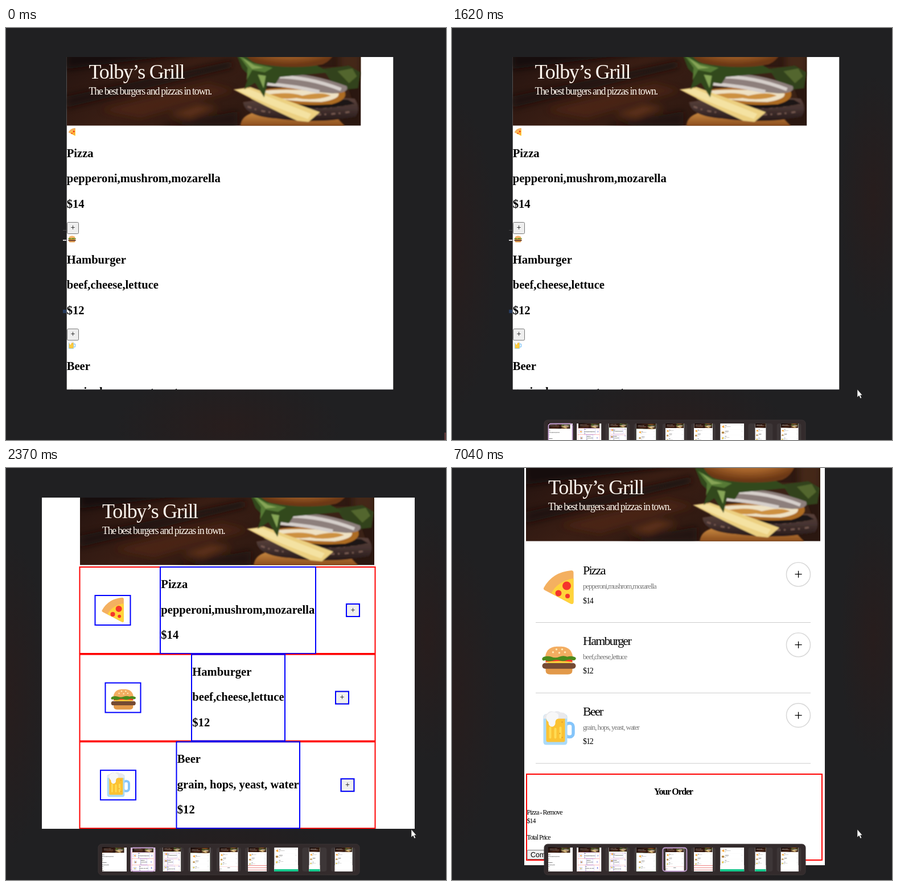
An HTML page that plays this animation: 773x724 px, repeating every 8 s.

```html
<!DOCTYPE html>
<html lang="en">
<head>
<meta charset="utf-8">
<title>Menu page steps</title>
<style>
  html, body { margin: 0; width: 100%; height: 100%; overflow: hidden; background: #202022; }
  #stage { display: block; width: 773px; height: 724px; }
  text { white-space: pre; }
  .bold { font: bold 20.6px "Liberation Serif", "Times New Roman", serif; }
  .menu { font-family: "Liberation Serif", "Times New Roman", serif; letter-spacing: -.08em; }
  .plus { font-family: "Liberation Serif", "Times New Roman", serif; text-anchor: middle; }
  .ui { font-family: "Liberation Sans", Arial, sans-serif; }
  .box { fill: none; stroke-width: 2; }

  .scene, .corner, .sides, .cursor, .strip, .pick { animation: 8s step-end infinite; }
  .scene { visibility: hidden; }
  .scene1 { animation-name: scene1; }
  .scene2 { animation-name: scene2; }
  .scene3 { animation-name: scene3; }
  .scene4 { animation-name: scene4; }
  .scene5 { animation-name: scene5; }
  .corner { animation-name: corner; }
  .sides { animation-name: sides; }
  .cursor { animation-name: cursor; }
  .strip { animation-name: strip; }
  .pick { animation-name: pick; }

  @keyframes scene1 { 0% { visibility: visible } 29.625%, 100% { visibility: hidden } }
  @keyframes scene2 { 0% { visibility: hidden } 29.625% { visibility: visible } 47.25%, 100% { visibility: hidden } }
  @keyframes scene3 { 0% { visibility: hidden } 47.25% { visibility: visible } 69.625%, 100% { visibility: hidden } }
  @keyframes scene4 { 0% { visibility: hidden } 69.625% { visibility: visible } 88%, 100% { visibility: hidden } }
  @keyframes scene5 { 0% { visibility: hidden } 88%, 100% { visibility: visible } }
  @keyframes corner { 0% { visibility: visible } .875%, 100% { visibility: hidden } }
  @keyframes sides { 0% { visibility: hidden } 19.375%, 100% { visibility: visible } }

  @keyframes cursor {
    0% { transform: translate(662px, 730px) }
    8.25% { transform: translate(662px, 714px) }
    9.125% { transform: translate(669px, 689px) }
    10% { transform: translate(677px, 664px) }
    10.875% { transform: translate(686px, 645px) }
    11.75% { transform: translate(694px, 633px) }
    12.625% { transform: translate(701px, 627px) }
    13.5% { transform: translate(707px, 626px) }
    14.375% { transform: translate(711px, 631px) }
    16%, 100% { transform: translate(712px, 635px) }
  }
  @keyframes strip {
    0% { transform: translateY(64px) }
    19.375% { transform: translateY(44px) }
    20.25% { transform: translateY(28px) }
    21.125% { transform: translateY(17px) }
    22% { transform: translateY(9px) }
    22.875% { transform: translateY(5px) }
    23.75% { transform: translateY(2px) }
    24.625% { transform: translateY(1px) }
    25.5%, 100% { transform: none }
  }
  @keyframes pick {
    0% { transform: none }
    29.625% { transform: translateX(50.2px) }
    47.25% { transform: translateX(100.4px) }
    69.625% { transform: translateX(150.6px) }
    88%, 100% { transform: translateX(200.8px) }
  }
</style>
</head>
<body>
<svg id="stage" viewBox="0 0 773 724">
  <defs>
    <radialGradient id="glow"><stop stop-color="#2a1c1b" stop-opacity=".75"/><stop offset="1" stop-color="#2a1c1b" stop-opacity="0"/></radialGradient>
    <linearGradient id="wood" x2="1" y2=".4"><stop stop-color="#22120f"/><stop offset=".45" stop-color="#3a1e14"/><stop offset="1" stop-color="#2a1710"/></linearGradient>
    <radialGradient id="bun" cx=".5" cy=".35" r=".6"><stop stop-color="#c4853f"/><stop offset=".6" stop-color="#a4622a"/><stop offset="1" stop-color="#6b3714"/></radialGradient>
    <linearGradient id="base" x2="0" y2="1"><stop stop-color="#c98a42"/><stop offset="1" stop-color="#8b4d1d"/></linearGradient>
    <linearGradient id="patty" x2="0" y2="1"><stop stop-color="#5b423b"/><stop offset=".5" stop-color="#453230"/><stop offset="1" stop-color="#261918"/></linearGradient>
    <filter id="soft" x="-20%" y="-50%" width="140%" height="200%"><feGaussianBlur stdDeviation="6"/></filter>
    <filter id="blur"><feGaussianBlur stdDeviation="1"/></filter>

    <g id="pizza">
      <path fill="#f4b060" d="M4 31Q19 4 52 1q4 0 4 4v51q0 6-6 3L6 36q-4-2-2-5"/>
      <path fill="#ffd43b" d="M17 41Q28 20 56 15v41q0 6-6 3z"/>
      <g fill="#f5352c"><circle cx="44" cy="28" r="7.5"/><circle cx="29.5" cy="41" r="5.5"/><circle cx="45.5" cy="46" r="4"/></g>
    </g>
    <g id="burger">
      <path fill="#e2994a" d="M7 49h47v4q0 7-8 7H15q-8 0-8-7z"/>
      <path fill="#f3ad61" d="M6 32q1-20 20-21h9q19 1 20 21z"/>
      <path fill="#f5352c" d="M7 33h47v6H7z"/>
      <path fill="#ffd43b" d="M6 38q25-3 49 0l-10 4q-14 4-28 0z"/>
      <path fill="#4c8a1c" d="M4 29q7-2 13 0 7 3 14 0t14 0q6-2 12 0 4 1 3 4-1 3-6 2-5-2-10 0-7 3-13 0-6-2-12 1-8 2-13-1-4 2-5-1t3-5"/>
      <rect x="1" y="40" width="59" height="10" rx="5" fill="#754a33"/>
      <g fill="#ffe9b5"><circle cx="26" cy="16" r="1.7"/><circle cx="36" cy="16" r="1.7"/><circle cx="20" cy="21" r="1.7"/><circle cx="31" cy="22" r="1.7"/><circle cx="41" cy="21" r="1.7"/></g>
    </g>
    <g id="beer">
      <rect x="42" y="22" width="13.5" height="24" rx="6" fill="none" stroke="#85c5fa" stroke-width="5.5"/>
      <rect x="3" y="6" width="42" height="54" rx="5" fill="#aadaf8"/>
      <rect x="8" y="12" width="33" height="43" rx="3" fill="#fbc233"/>
      <path stroke="#ffdc55" stroke-width="4" stroke-linecap="round" d="M15 30v17M24 32v15M33 30v17"/>
      <path fill="#e9e9ec" d="M3 14Q3 6 10 5q4-6 12-3 7-3 11 1 11-1 12 11z"/>
      <path fill="#f7f7f8" d="M9 8q6-8 15-5 8 2 5 11-5 1-5 7v2q-2 6-7 5-5-1-5-8-6-5-3-12"/>
      <g fill="#d98b2a"><circle cx="36" cy="20" r="1"/><circle cx="32" cy="40" r="1"/><circle cx="36" cy="47" r="1"/></g>
    </g>
    <svg id="photo" width="517" height="143.5">
      <path fill="url(#wood)" d="M0 0h517v144H0z"/>
      <g filter="url(#soft)">
        <path fill="#170d0c" d="M0 0h290v8L0 44z"/>
        <path fill="#5a2c18" opacity=".5" d="M60 116l190-46 45 12-165 48z"/>
        <path fill="#180d0b" opacity=".8" d="M0 92l290-62v12L0 112z"/>
        <path fill="#804322" opacity=".55" d="M180 124l50-17 36 4-50 19z"/>
        <path fill="#180c0b" opacity=".7" d="M160 144l140-26v26z"/>
        <path fill="#50301a" opacity=".7" d="M480 0h37v60h-37z"/>
      </g>
      <g filter="url(#blur)">
        <path fill="#3a2416" d="M316 40h165l25 70-180 6z"/>
        <path fill="url(#base)" d="M305 144q2-20 28-24l140 8 16 16z"/>
        <path fill="url(#patty)" d="M310 102q80-12 196-6 12 16 2 32-66 13-140 3-56-4-58-29"/>
        <path fill="none" stroke="#76594f" stroke-width="3" stroke-dasharray="7 6 3 9" d="M425 112q40 2 78-8M440 124q30 0 60-5M318 110q20 8 40 10"/>
        <path fill="#1f1412" d="M326 90l168 8 12 7q-60 14-130 4z"/>
        <path fill="#ad6c23" d="M318 86q70-18 170-4 8 16-22 24-84 6-148-20"/>
        <path fill="#efe2c4" d="M330 84q60-9 148 3 2 10-30 15-76 0-118-18"/>
        <path fill="#cd9140" d="M352 89q40-6 62 2 34-8 50 0-30 10-60 4-30 4-52-6"/>
        <path fill="#ecd081" d="M293 80l30-4 122 44-20 17-20-2Q350 110 293 80"/>
        <path fill="#f4e2a2" d="M300 81l20-2 110 44-6 9Q350 106 300 81"/>
        <path fill="#33431c" d="M450 44l46-6 20 12-4 28-36 4z"/>
        <path fill="#52662d" d="M476 48l26-5 8 14-14 12z"/>
        <path fill="#8d7f7b" d="M340 56q66-14 152 18 6 12-24 13-80-6-128-31"/>
        <path fill="none" stroke="#d6cfcb" stroke-width="6" d="M350 58q66-4 132 22M352 70q50 4 92 14"/>
        <path fill="#30481d" d="M297 15q24-2 36 14l44 9 60-2 24 14-86 8-8 12-14-2-6 26-16-26-19 12 8-25-12-12z"/>
        <path fill="#567a36" d="M302 20l26 14 34 8-14 8-22-4-10 18 2-22z"/>
        <path fill="#86a556" d="M308 24l22 14 16 4-20 2zM336 54l14 2-4 22z"/>
        <path fill="url(#bun)" d="M308-30q-6 54 26 64 62 12 116 2 30-12 27-66z"/>
      </g>
      <g class="menu" fill="#fff8ef">
        <text x="39" y="60.5" font-size="36">Tolby’s Grill</text>
        <text x="39" y="88.5" font-size="17.9">The best burgers and pizzas in town.</text>
      </g>
    </svg>
  </defs>
</svg>
<script>
const dishes = [
  ['Pizza', 'pepperoni,mushrom,mozarella', '$14', 'pizza'],
  ['Hamburger', 'beef,cheese,lettuce', '$12', 'burger'],
  ['Beer', 'grain, hops, yeast, water', '$12', 'beer']
];

const rect = (x, y, w, h, attrs) => `<rect x="${x}" y="${y}" width="${w}" height="${h}" ${attrs}/>`;
const box = (x, y, w, h, color) => rect(x, y, w, h, `class="box" stroke="${color}"`);
const text = (x, y, cls, s, attrs = '') => `<text x="${x}" y="${y}" class="${cls}" ${attrs}>${s}</text>`;
const line = (x1, x2, y) => `<path d="M${x1} ${y}H${x2}" stroke="#ccc"/>`;
const photo = (x, y) => `<use href="#photo" x="${x}" y="${y}"/>`;
const icon = (name, x, y, k = 1) => `<use href="#${name}" transform="translate(${x} ${y}) scale(${k})"/>`;
const plus = (x, y, size) => text(x, y + size / 4, 'plus', '+', `font-size="${size}"`);
const button = (x, y, w, h, size) =>
  rect(x + .5, y + .5, w - 1, h - 1, 'rx="2" fill="#efefef" stroke="#767676"') + plus(x + w / 2, y + h / 2, size);
const rows = draw => dishes.map(draw).join('');

const boldLines = (x, y, d) => [0, 1, 2].map(n => text(x, y + n * 44.6, 'bold', d[n])).join('');
const menuLines = (x, y, d) =>
  text(x, y, 'menu', d[0], 'font-size="22"') +
  text(x, y + 25, 'menu', d[1], 'font-size="12.8" fill="#767676"') +
  text(x, y + 50.5, 'menu', d[2], 'font-size="14"');

// Each page crops itself to its white sheet.
const page = (id, x, y, w, h, body) =>
  `<svg id="${id}" x="${x}" y="${y}" width="${w}" height="${h}" viewBox="${x} ${y} ${w} ${h}">` +
  rect(x, y, w, h, 'fill="#fff"') + body + '</svg>';

const plain = page('plain', 106.5, 51, 574, 584.5, photo(106.5, 28) + rows((d, i) => {
  const y = i * 187.3;
  return icon(d[3], 109, 175.5 + y, .23) + boldLines(106.7, 226.5 + y, d) + button(107, 341 + y, 21, 21, 14);
}));

const spread = page('spread', 63, 52, 655, 582, photo(130, 27) + rows((d, i) => {
  const y = 174 + i * 153.6;
  const [pic, left, width, add] = [[156.5, 271, 273, 598], [174.5, 326, 164, 579], [166, 299.5, 216.5, 588.5]][i];
  return box(129.5, y, 519, 152, '#f00') + box(pic, y + 50, 62, 52, '#00f') +
    icon(d[3], pic + 9.5, y + 53, .73) + box(left, y, width, 152, '#00f') +
    boldLines(left + 1.3, y + 37, d) + button(add, y + 65, 23, 22, 14) + box(add, y + 65, 23, 22, '#00f');
}));

const boxed = page('boxed', 131, 0, 521, 702, photo(138, -30) + box(144, 117, 505.5, 620, '#008000') + rows((d, i) => {
  const y = 153 + i * 188;
  return box(180.5, y, 432.5, 152, '#f00') + box(180.5, y, 83, 70, '#00f') + icon(d[3], 191.5, y + 3) +
    box(263, y, [273, 164, 216.5][i], 152, '#00f') + boldLines(264, y + 37, d) +
    button(590, y, 23, 22, 14) + box(590, y, 23, 22, '#00f');
}));

const styled = page('styled', 125, 16, 531, 655, photo(131, 16) + box(130.5, 163, 518.5, 476, '#008000') + rows((d, i) => {
  const y = i * 147;
  return icon(d[3], 193, 218 + y) + menuLines(265, 237 + y, d) + button(596, 216 + y, 18, 20, 8) + line(165, 631, 310 + y);
}));

const order = page('order', 127, 0, 528, 698, photo(130, -15) + rows((d, i) => {
  const y = i * 123.8;
  return icon(d[3], 157.5, 179 + y) + menuLines(230, 187 + y, d) +
    `<circle cx="608.5" cy="${187 + y}" r="21" fill="#fff" stroke="#d9d9d9" stroke-width="1.6"/>` +
    plus(608.5, 188.5 + y, 26) + line(147, 630, 271.5 + y);
}) + box(131, 538, 519, 151, '#f00') +
  text(355, 574, 'menu', 'Your Order', 'font-size="16.1" font-weight="bold"') +
  text(131.5, 609, 'menu', 'Pizza - Remove', 'font-size="11.9"') +
  text(131.5, 624, 'menu', '$14', 'font-size="11.9"') +
  text(131.5, 653, 'menu', 'Total Price', 'font-size="11.9"') +
  rect(132, 671.5, 100, 16, 'rx="2" fill="#efefef" stroke="#767676"') +
  text(138, 684, 'ui', 'Complete order', 'font-size="12.5"'));

const pages = [plain, spread, boxed, styled, order];
const edgeMarks =
  rect(100, 355, 6, 1, 'fill="#48484a"') + rect(100, 372, 6, 2, 'fill="#d0d0d0"') + rect(100, 495, 6, 6, 'fill="#263a5c"');

// Thumbnails: page, left inset, width, visible area.
const thumbs = [
  ['plain', 0, 43, '107 51 574 560'], ['spread', 0, 43, '63 52 655 582'], ['boxed', 6, 32, '131 0 521 702'],
  ['styled', 4, 35, '125 16 531 655'], ['order', 5, 33, '127 0 528 698'], ['order', 5, 33, '127 0 528 698'],
  ['order', 1, 42, '127 140 528 530'], ['order', 12, 19, '127 0 320 698'], ['order', 7, 31, '127 0 528 698']
];
const thumb = ([id, inset, w, view], i) => {
  const x = 169 + i * 50.2, left = x + inset;
  let art = rect(x, 667, 43, 42, 'rx="4" fill="#3d3637"') +
    `<svg x="${left}" y="667" width="${w}" height="42" viewBox="${view}" preserveAspectRatio="xMidYMin slice"><use href="#${id}"/></svg>`;
  if (i > 4) art += rect(left, 698, w, 11, 'fill="#fff"');
  if (i === 5) art += `<path d="M${left} 698.5h${w}m0 4h-${w}m0 4h${w}" stroke="#e88" fill="none"/>`;
  if (i === 6 || i === 7) art += rect(left, 705, w, 4, 'fill="#16c98d"');
  return art;
};

const glow = (cx, cy, rx, ry) => `<ellipse cx="${cx}" cy="${cy}" rx="${rx}" ry="${ry}" fill="url(#glow)"/>`;

document.getElementById('stage').insertAdjacentHTML('beforeend',
  rect(0, 0, 773, 724, 'fill="#202022"') + glow(390, 700, 200, 90) +
  `<g class="sides">${glow(0, 400, 80, 280)}${glow(740, 300, 60, 220)}</g>` +
  rect(770, 711, 3, 13, 'class="corner" fill="#5b3838"') +
  pages.map((p, i) => `<g class="scene scene${i + 1}">${p}${i ? '' : edgeMarks}</g>`).join('') +
  '<g class="strip">' + rect(162, 661, 459, 54, 'rx="6" fill="#332b2c" stroke="#3b3435"') + thumbs.map(thumb).join('') +
  rect(169.5, 667.5, 42, 41, 'class="pick" rx="4" fill="none" stroke="#c9a3d8" stroke-width="1.8"') + '</g>' +
  '<path class="cursor" d="M0 0v14l3.2-3 2.2 5 2.2-1-2.1-4.8H9z" fill="#fff" stroke="#222" stroke-width=".6"/>');
</script>
</body>
</html>
```
